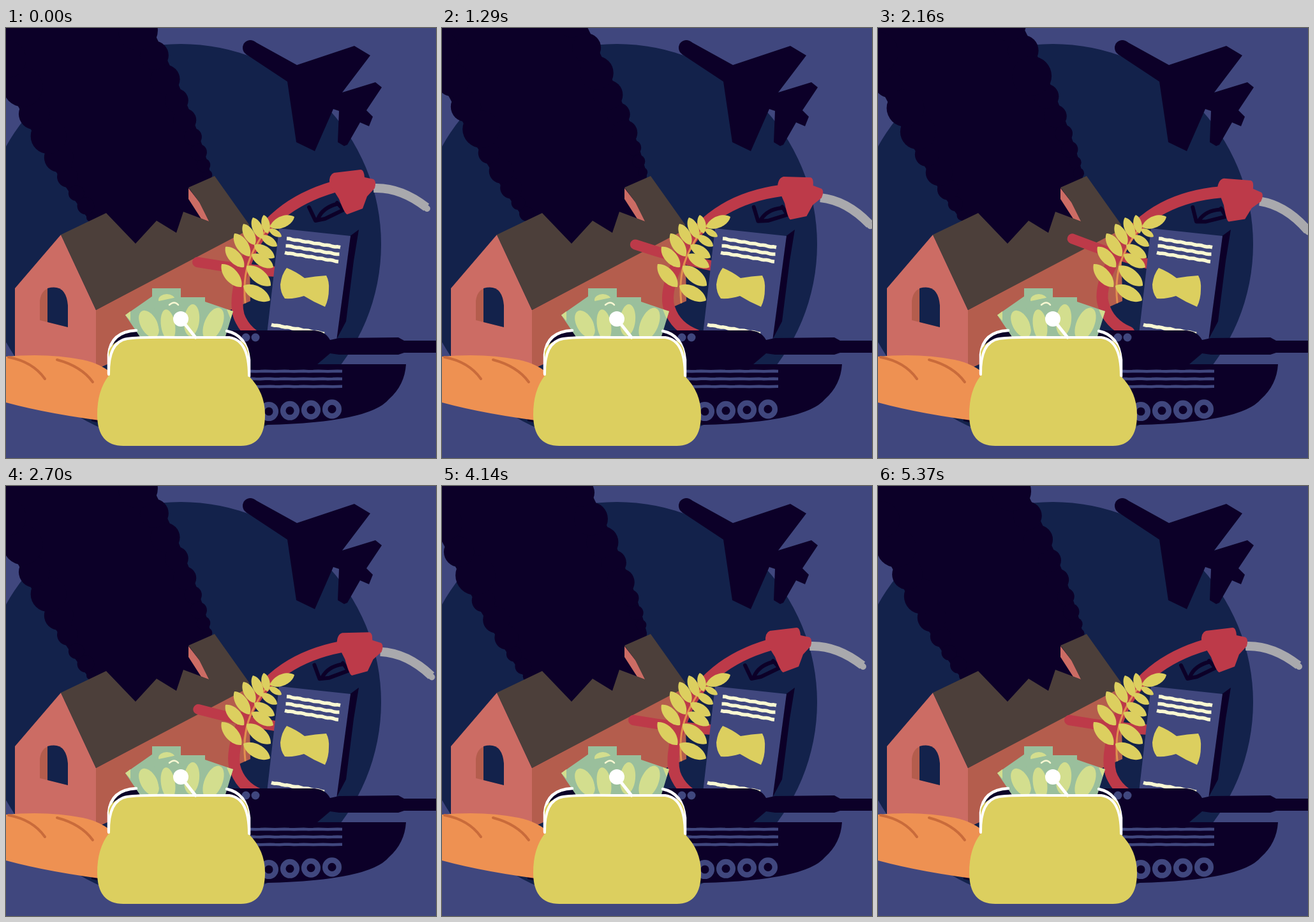
An HTML page with a canvas that plays this animation: 674x674 px, repeating every 5.4 s.

```html
<!DOCTYPE html>
<html>
<head>
<meta charset="utf-8">
<style>
html, body { margin: 0; width: 100%; height: 100%; overflow: hidden; background: #40477e; }
canvas { display: block; width: 674px; height: 674px; }
</style>
</head>
<body>
<canvas id="stage" width="674" height="674"></canvas>
<script>
const ctx = document.getElementById('stage').getContext('2d');
const LOOP = 5400, STEP = 30;
const BLUE = '#40477e', NAVY = '#13224b', DARK = '#0c0028', RED = '#bd3a49',
  YELLOW = '#dccf5f', BRICK = '#b45d4d', ROSE = '#cc6c64', CREAM = '#f9f8d3',
  GREEN = '#9abf9c', LIME = '#d3de8e', WHITE = '#ffffff';

function fill(d, color) {
  ctx.fillStyle = color;
  ctx.fill(new Path2D(d));
}
function line(d, color, width, cap = 'round') {
  ctx.strokeStyle = color;
  ctx.lineWidth = width;
  ctx.lineCap = cap;
  ctx.lineJoin = 'round';
  ctx.stroke(new Path2D(d));
}
function oval(x, y, rx, ry, color, turn = 0) {
  ctx.fillStyle = color;
  ctx.beginPath();
  ctx.ellipse(x, y, rx, ry, turn, 0, Math.PI * 2);
  ctx.fill();
}
function dot(x, y, r, color) { oval(x, y, r, r, color); }

// Chalk-like line with a slightly uneven edge
function chalk(x1, y1, x2, y2, color, width, wobble) {
  let d = '';
  for (let i = 0; i <= 20; i++) {
    const k = i / 20;
    const y = y1 + (y2 - y1) * k + Math.sin(i * 1.7 + y1) * wobble;
    d += (i ? 'L' : 'M') + (x1 + (x2 - x1) * k) + ',' + y;
  }
  line(d, color, width, 'butt');
}
// Pointed leaf between two ends
function leaf(x1, y1, x2, y2) {
  const dx = x2 - x1, dy = y2 - y1, ox = -dy * .29, oy = dx * .29;
  const at = (k, side) => [x1 + dx * k + ox * side, y1 + dy * k + oy * side];
  ctx.fillStyle = YELLOW;
  ctx.beginPath();
  ctx.moveTo(x1, y1);
  ctx.bezierCurveTo(...at(.2, 1), ...at(.8, 1), x2, y2);
  ctx.bezierCurveTo(...at(.8, -1), ...at(.2, -1), x1, y1);
  ctx.fill();
}
const ease = k => {
  k = Math.min(1, Math.max(0, k));
  return (1 - Math.cos(Math.PI * k)) / 2;
};
const rand = n => {
  const v = Math.sin(n * 127.1 + 11.7) * 43758.5453;
  return v - Math.floor(v);
};

const edges = [
  { p: [[132, 303], [62, 213], [-30, 28]], out: [-.85, .5], seed: 3, shift: .04 },
  { p: [[321, 230], [297, 131], [208, -40]], out: [.93, -.37], seed: 40, shift: .02 }
];
function along([a, b, c], u) {
  const v = 1 - u;
  return [0, 1].map(i => v * v * a[i] + 2 * v * u * b[i] + u * u * c[i]);
}
function smoke(t) {
  fill('M132,303Q62,213 -30,28L-30,-40L208,-40Q297,131 321,230L318,305L203,350Z', DARK);
  const count = 9;
  for (const e of edges) {
    for (let i = 0; i < count; i++) {
      const q = (i / count + e.shift + 2 * t / LOOP) % 1;
      const u = Math.pow(q, 1.2);
      const r = (8 + 18 * Math.min(1, u * 1.5)) * (.8 + .45 * rand(i + e.seed));
      const [x, y] = along(e.p, u);
      dot(x - e.out[0] * r * .68, y - e.out[1] * r * .68, r, DARK);
    }
  }
}

function plane() {
  dot(383, 31, 12, DARK);
  fill('M389,21L456,58L546,28L571,43L527,101L579,85L589,93L565,129L575,139L569,154L555,148L535,183L530,185L520,179L522,130L513,127L484,193L455,179L441,84L376,41Z', DARK);
}

function house() {
  fill('M141,442L381,314L383,428L141,535Z', BRICK);
  fill('M14,408L86,324L141,442V535L14,517Z', ROSE);
  fill('M53,458V428Q55,410 70,407Q95,405 97,435V469Z', BRICK);
  fill('M65,461V408Q94,400 97,435V469Z', NAVY);
  fill('M286,251L304,274L319,304L306,299L286,268Z', ROSE);
  fill('M86,324L157,290L203,338L236,302L267,321L278,288L318,303L303,273L286,250L327,232L381,308V316L141,442Z', '#4c3f3a');
}

function pump(t) {
  const a = .2 * (ease((t - 570) / 1080) - ease((t - 2200) / 950));
  ctx.save();
  ctx.translate(485, 372);
  ctx.rotate(a);
  ctx.translate(-485, -372);
  line('M300,367C340,374 380,380 440,383', RED, 16);
  line('M514,249C452,267 398,304 376,368C362,405 358,440 368,458Q382,486 416,493', RED, 18);
  line('M475,281L485,302L500,299L529,285L519,274M489,299Q496,282 518,276', DARK, 6);
  line('M576,251Q618,249 659,281', '#a9a9ad', 14, 'butt');
  line('M656,280L660,283', '#a9a9ad', 10);
  fill('M514,227L556,222Q561,222 562,234L576,237Q581,240 578,251L566,264L559,283L535,292Q531,292 522,268L507,244Q506,230 514,227Z', RED);
  ctx.restore();
}

function book() {
  fill('M538,327L553,316L545,365L533,460L517,490Z', DARK);
  fill('M428,314L540,326L518,490L409,480Z', BLUE);
  for (let i = 0; i < 3; i++)
    chalk(440 - i * 1.5, 330 + i * 11, 524 - i * 1.5, 344 + i * 11, CREAM, 5.5, .5);
  chalk(416, 465, 499, 479, CREAM, 5.5, .5);
  fill('M440,376Q455,382 468,392Q485,389 502,388Q507,397 506,410Q506,425 500,437Q483,430 467,420Q452,425 437,424Q430,415 430,402Q432,386 440,376Z', YELLOW);
}

function wheat() {
  line('M375,430Q370,385 387,351T416,309', '#e2904f', 3);
  [[338, 370, 369, 406], [344, 343, 373, 375], [358, 322, 382, 358],
   [372, 307, 390, 340], [387, 297, 401, 330], [404, 293, 410, 322],
   [414, 312, 452, 296], [412, 315, 432, 327], [400, 325, 425, 342],
   [389, 340, 421, 360], [385, 355, 419, 375], [377, 373, 415, 404],
   [372, 404, 414, 427]].forEach(p => leaf(...p));
}

function tank() {
  fill('M340,474H480Q500,474 508,489L522,486L615,485L624,490H674V509H624L615,512H522L508,510L488,527H627Q625,560 600,582Q570,618 410,622H340Z', DARK);
  dot(376, 485, 6.5, BLUE);
  dot(391, 485, 6.5, BLUE);
  for (let i = 0; i < 3; i++) chalk(376, 538 + i * 12, 527, 538 + i * 12, BLUE, 4.5, .2);
  for (let i = 0; i < 4; i++) {
    ctx.strokeStyle = BLUE;
    ctx.lineWidth = 8.5;
    ctx.beginPath();
    ctx.arc(412 + i * 33, 601 - i * 1.2, 10.8, 0, Math.PI * 2);
    ctx.stroke();
  }
}

function bread() {
  fill('M134,612L160,600V622L134,616Z', DARK);
  fill('M0,515Q65,509 120,520Q150,526 170,545V618Q70,606 0,587Z', '#ee9152');
  line('M4,516Q42,523 61,550M80,520Q118,530 136,555', '#c96b3b', 4);
}

function bills() {
  fill('M229,408H274V450H229Z', GREEN);
  oval(252, 426, 13, 9, LIME);
  fill('M187,450L230,420L265,490H214Z', GREEN);
  fill('M187,450L195,444L195,459Z', LIME);
  oval(224, 464, 13, 23, LIME, -.5);
  fill('M312,429L356,444L342,490H285Z', GREEN);
  fill('M356,444L346,441L352,456Z', LIME);
  fill('M230,430L268,422H312V490H244Z', GREEN);
  oval(254, 466, 11, 25, LIME, -.15);
  oval(291, 458, 12, 25, LIME, .1);
  oval(325, 464, 14, 27, LIME, .4);
  line('M256,434Q264,427 270,434', CREAM, 2.5);
}

function purse() {
  fill('M161,540V512Q164,475 203,474L220,490H330L347,475Q378,482 382,518V545Z', DARK);
  bills();
  line('M161,542V512Q164,476 204,474M346,475Q377,481 381,520V546', WHITE, 4.5);
  fill('M161,545V508Q165,490 195,486H352Q378,488 380,512L381,546Q406,571 406,606Q406,655 368,655H184Q143,655 143,606Q143,568 161,545Z', YELLOW);
  line('M161,543Q160,492 190,487Q210,484 270,485H350Q381,489 381,545', WHITE, 4);
  line('M274,456L297,485', WHITE, 5);
  dot(274, 456, 12, WHITE);
}

function draw(t) {
  ctx.fillStyle = BLUE;
  ctx.fillRect(0, 0, 674, 674);
  dot(274, 339, 314, NAVY);
  plane();
  smoke(t);
  house();
  pump(t);
  book();
  wheat();
  tank();
  bread();
  purse();
}

const start = performance.now();
function tick() {
  const t = (performance.now() - start) % LOOP;
  draw(Math.floor(t / STEP) * STEP);
  requestAnimationFrame(tick);
}
tick();
</script>
</body>
</html>
```
